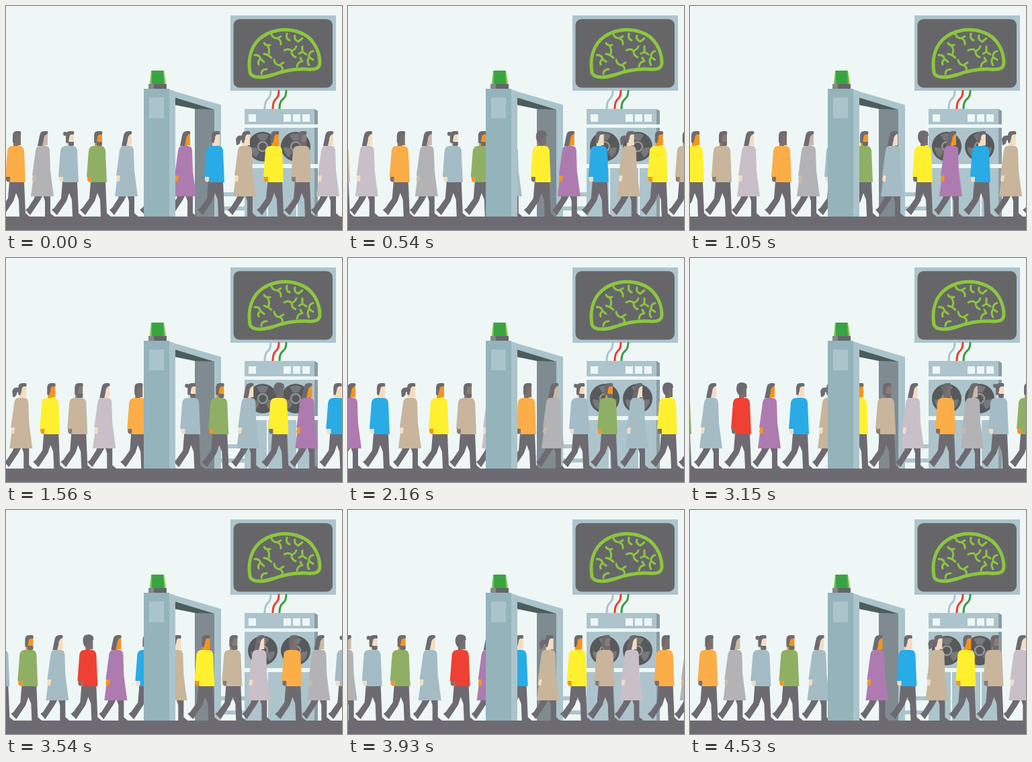
Write an HTML page that moves like this. It is 500 px wide and 333 px high and loops after 4560 ms.

```html
<!DOCTYPE html>
<html lang="en">
<head>
<meta charset="utf-8">
<title>Scanner queue</title>
<style>
html, body { margin: 0; width: 100%; height: 100%; overflow: hidden; background: #eef7f6; }
svg { display: block; width: 100vw; height: 100vh; }
.line { fill: none; stroke-linecap: round; stroke-linejoin: round; }
#screen { fill: #666668; }
#brain { stroke: #8cc63f; }
#lamp { fill: #3aa442; }
#lampEdge { fill: #7cc344; }
.alarm #screen, .alarm #lamp { fill: #ee4033; }
.alarm #lampEdge { fill: #f58a7c; }
.alarm #brain { stroke: #fff; }
</style>
</head>
<body>
<svg id="stage" viewBox="0 0 500 333">
  <defs>
    <g id="reel">
      <circle r="22" fill="#58595b"/>
      <path d="M-4-9L-9-17A19 19 0 0 1 9-17L4-9ZM9 2L18 1A19 19 0 0 1 10 16L5 9ZM-9 2L-18 1A19 19 0 0 0-10 16L-5 9Z" fill="#77787b"/>
      <circle r="7" fill="#58595b" stroke="#929497" stroke-width="2.5"/>
    </g>
  </defs>

  <!-- monitor -->
  <rect x="334" y="14" width="157" height="112" fill="#adc4cc"/>
  <rect id="screen" x="338.500" y="19.500" width="147.500" height="102" rx="9"/>
  <g id="brain" class="line" stroke-width="3">
    <path stroke-width="5" d="M363 99C360 80 364 62 376 50C392 35 416 32 436 39C456 45 467 66 467 84C467 93 460 95 448 94C430 93 412 97 398 102C382 107 366 108 363 99Z"/>
    <path d="M395 42Q397 48 404 48Q410 51 409 57M404 48L409 45M418 41Q416 49 422 51M430 44Q428 50 435 53L441 48M384 55Q387 60 393 58M389 59Q394 66 390 73L384 71M390 73L395 77M370 73Q377 72 379 79M379 79Q374 82 376 87M379 79L384 83M380 101Q380 94 388 94M399 80Q400 87 407 88Q413 91 411 95M407 88L413 84M414 66Q421 62 425 67Q431 64 432 60M425 67Q425 74 431 76M441 60V68L447 72M441 68L436 71M457 67Q450 69 451 76Q447 82 451 88M451 76L457 80M433 90Q434 83 441 82M441 82L438 77"/>
  </g>

  <!-- computer -->
  <g class="line" stroke-width="3">
    <path stroke="#adc4cc" d="M394 126C394 142 385 134 385 153"/>
    <path stroke="#e8402f" d="M406 126C406 142 397 134 397 153"/>
    <path stroke="#3b9c46" d="M417 126C417 142 407 134 407 153"/>
  </g>
  <path fill="#adc4cc" d="M355 153H459V176H355ZM355 181H459V235H355ZM355 241H459V313H355ZM320 277H356V283H320ZM320 298H356V304H320Z"/>
  <path fill="#8a9ca4" d="M459 153L464 156V176H459ZM459 181H464V235H459ZM459 241H464V313H459Z"/>
  <path fill="#eef7f6" d="M361 161h11v11h-11zM413 161h11v11h-11zM427 161h11v11h-11zM441 161h11v11h-11z"/>
  <path class="line" stroke="#eef7f6" stroke-width="2" d="M389 312V237H433V312"/>
  <use href="#reel" x="382" y="209"/>
  <use href="#reel" x="431" y="209"/>

  <!-- far side of the gate -->
  <path fill="#7f8b91" d="M281 151H311V313H281Z"/>
  <path fill="#4b5d5c" d="M251 135L311 154 281 153 251 147Z"/>
  <path fill="#abc4cb" d="M238 123L320 147V313H310V154L251 136H238Z"/>

  <rect y="313" width="500" height="20" fill="#6d6b71"/>
  <g id="queue"></g>

  <!-- near post and lamp -->
  <path fill="#94b3bb" d="M205 123H243V313H205Z"/>
  <path fill="#abc4cb" d="M243 124L252 127V313H243Z"/>
  <rect x="213" y="136" width="22" height="31" fill="#abc4cb"/>
  <path fill="#646569" d="M212 116H239V123H212Z"/>
  <path fill="#85878a" d="M212 116H220V123H212Z"/>
  <path id="lampEdge" d="M216 96H235L238 116H214Z"/>
  <path id="lamp" d="M217 96H234L235 116H217Z"/>
</svg>
<script>
const LOOP = 4560, STEP = 30, SPEED = 0.1162, SPAN = 514;
const HAIR = '#6d6b71', LIGHT = '#f5dcc0', AMBER = '#f7941e', DARK = '#7a706c';
const POST = 215;

// start offset, clothes, skin, hair style, wears a dress, clothes after the gate
const people = [
  [0, '#fbad48', DARK, 'short'],
  [38, '#b3b3b5', '#cbb9a7', 'long', true],
  [79, '#a3bcc6', LIGHT, 'short bun beard'],
  [121, '#8fb064', AMBER, 'short beard'],
  [163, '#a5bcc5', LIGHT, 'long', true],
  [210, '#ee4033', DARK, 'afro', false, '#fff02f'],
  [250, '#ae7bb0', AMBER, 'long', true],
  [296, '#29abe6', LIGHT, 'short'],
  [339, '#c8b59c', LIGHT, 'short tail', true],
  [384, '#fff02f', AMBER, 'short'],
  [425, '#c8b59c', '#8b7c73', 'short beard'],
  [463, '#c8bfc8', LIGHT, 'long', true]
];

const hair = {
  short: 'M12 203V193Q12 186 18 186H23Q25 187 24 191H20Q17 192 17 197L15 204Z',
  bun: 'M8 190a3 3 0 1 1 6 0a3 3 0 1 1-6 0Z',
  long: 'M9 208L12 193Q13 186 19 186H23Q25 187 24 190Q18 192 18 199L16 208Z',
  afro: 'M9 194Q9 185 17 185Q25 185 25 193L19 195 17 204H13Q9 200 9 194Z',
  beard: 'M15 200L18 202H24V207Q20 210 16 207Z',
  tail: 'M14 193Q5 191 3 198L4 207Q10 206 10 200L14 198Z'
};
const head = 'M13 211V191Q14 187 18 187H24V207H20V211Z';

const outfits = {
  shirt: {
    legs: 'M5 261H27L29 308 35 313H20L19 288 15 278 11 290-3 311-11 303-7 300 3 286Z',
    top: 'M-1 254L2 215Q3 208 10 208H20Q26 208 27 215L29 262H6V254Z',
    hand: 'M0 254H6V260Q3 264 0 259Z',
    headShift: -2
  },
  dress: {
    legs: 'M6 278H28V308L34 313H20V290L17 281 12 290-2 311-9 303-5 300 4 286Z',
    top: 'M1 252L6 215Q7 208 12 208H21Q26 208 27 214L28 245 33 283H-1L3 252Z',
    hand: 'M2 252H7L6 260Q3 263 1 259Z',
    headShift: 0
  }
};

const path = (d, fill, name = '') => `<path class="${name}" d="${d}" fill="${fill}"/>`;

function figure([, clothes, skin, style, dress]) {
  const outfit = outfits[dress ? 'dress' : 'shirt'];
  const locks = style.split(' ').map(s => path(hair[s], HAIR)).join('');
  return path(outfit.legs, HAIR) +
    `<g transform="translate(${outfit.headShift})">${path(head, skin)}${locks}</g>` +
    path(outfit.top, clothes, 'clothes') +
    path(outfit.hand, skin);
}

// Each person appears twice, one span apart, so the queue never ends.
const queue = document.getElementById('queue');
const walkers = people.flatMap(person => [0, -SPAN].map(shift => {
  const node = document.createElementNS('http://www.w3.org/2000/svg', 'g');
  node.innerHTML = figure(person);
  queue.append(node);
  return { node, shift, start: person[0], before: person[1], after: person[5] };
}));

const stage = document.getElementById('stage');
const between = (t, a, b) => t >= a && t < b;

function draw() {
  const t = Math.floor(performance.now() % LOOP / STEP) * STEP;
  for (const { node, shift, start, before, after } of walkers) {
    const x = (start + t * SPEED) % SPAN + shift;
    node.setAttribute('transform', `translate(${x.toFixed(2)})`);
    if (after) node.querySelector('.clothes').setAttribute('fill', x < POST - 5 ? before : after);
  }
  stage.classList.toggle('alarm', between(t, 150, 390) || between(t, 630, 870));
  requestAnimationFrame(draw);
}
draw();
</script>
</body>
</html>
```
